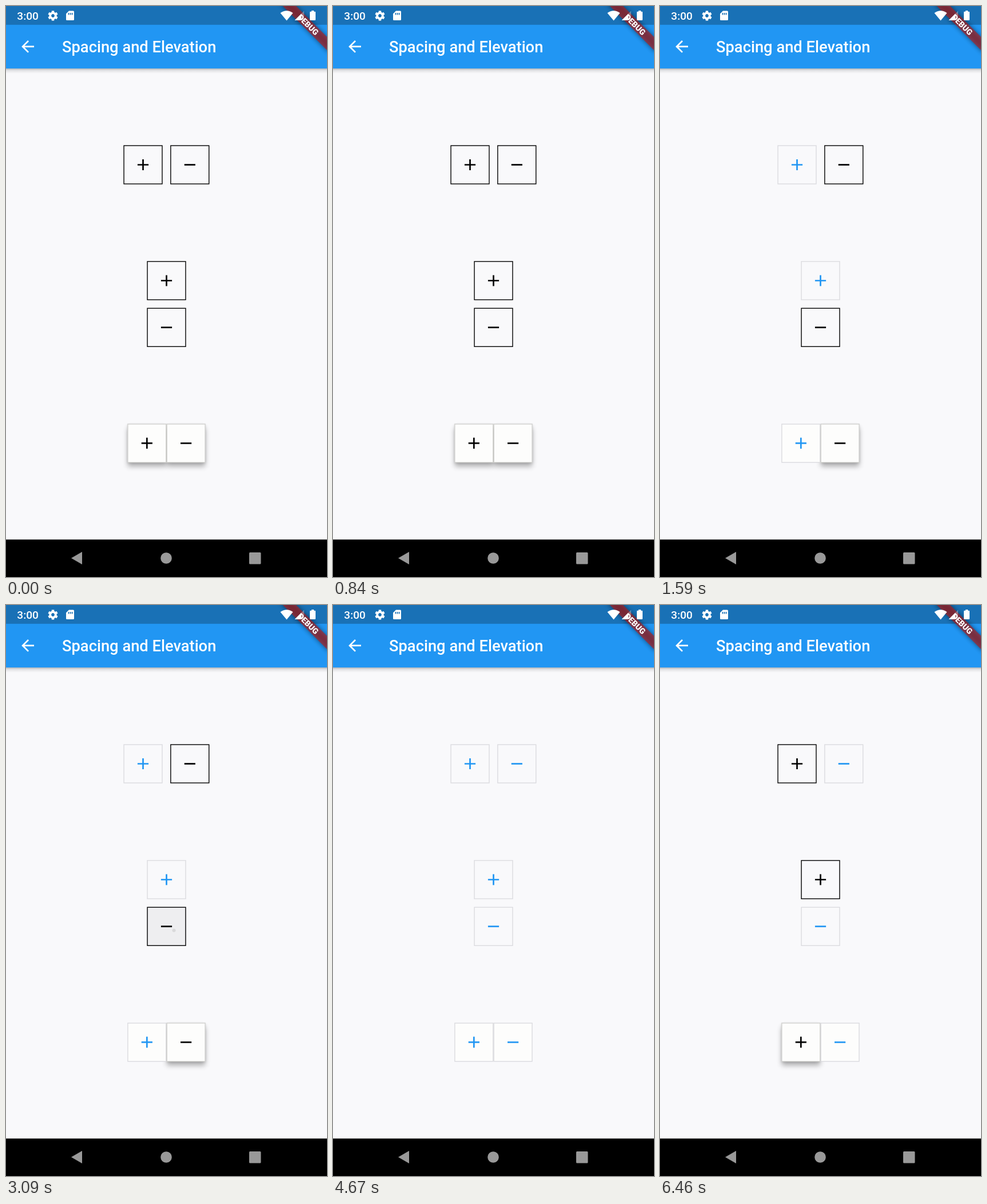
These frames come from a looping animation (561x998 px, 6500 ms). An HTML page:

```html
<!DOCTYPE html>
<html lang="en">
<head>
<meta charset="utf-8">
<title>Spacing and Elevation</title>
<style>
html, body { margin: 0; width: 100%; height: 100%; overflow: hidden; background: #f9f9fb; }
svg { display: block; width: 100vw; height: 100vh; }
text { font-family: Roboto, sans-serif; fill: #fff; }
</style>
</head>
<body>
<svg id="stage" viewBox="0 0 561 998">
  <defs>
    <linearGradient id="barShadow" x1="0" y1="0" x2="0" y2="1">
      <stop offset="0" stop-color="#000" stop-opacity=".27"/>
      <stop offset=".4" stop-color="#000" stop-opacity=".09"/>
      <stop offset="1" stop-color="#000" stop-opacity="0"/>
    </linearGradient>
    <filter id="soft" x="-40%" y="-40%" width="180%" height="180%"><feGaussianBlur stdDeviation="5"/></filter>
    <filter id="tight" x="-40%" y="-40%" width="180%" height="180%"><feGaussianBlur stdDeviation="2"/></filter>
    <filter id="ribbonBlur" x="-20%" y="-80%" width="140%" height="260%"><feGaussianBlur stdDeviation="4"/></filter>
  </defs>

  <rect width="561" height="998" fill="#f9f9fb"/>
  <rect y="109" width="561" height="9" fill="url(#barShadow)"/>
  <rect width="561" height="109.2" fill="#2196f3"/>
  <rect width="561" height="32.8" fill="#1971b6"/>
  <path transform="translate(21.7 54.5) scale(1.365)" fill="#fff" d="M20 11H7.83l5.59-5.59L12 4l-8 8 8 8 1.41-1.41L7.83 13H20z"/>
  <text x="98" y="81" font-size="27.3" font-weight="500">Spacing and Elevation</text>

  <g id="shadows"></g>
  <g id="buttons"></g>

  <g transform="translate(561 0) rotate(45)">
    <rect x="-60" y="38.2" width="120" height="16.4" fill="#000" opacity=".5" filter="url(#ribbonBlur)"/>
    <rect x="-60" y="38.2" width="120" height="16.4" fill="#b71c1c" opacity=".63"/>
    <text y="51.4" font-size="13.9" font-weight="900" text-anchor="middle">DEBUG</text>
  </g>

  <text x="19.3" y="24" font-size="19.1" font-weight="500">3:00</text>
  <g transform="translate(82 17)" fill="none" stroke="#fff">
    <circle r="4.8" stroke-width="3.8"/>
    <g id="teeth" stroke-width="4.4"></g>
  </g>
  <path fill="#fff" fill-rule="evenodd" d="M110 8.5h7.4q1.6 0 1.6 1.6v13.3q0 1.6-1.6 1.6h-10.8q-1.6 0-1.6-1.6V13.5zM108.6 12v3.6h1.7V12zM111.7 12v3.6h1.7V12zM114.8 12v3.6h1.7V12z"/>
  <path fill="#fff" d="M479.5 12.3Q490.5 4 501.5 12.3L490.5 25.5z"/>
  <path fill="#fff" opacity=".3" d="M521 8.5V25H504.5z"/>
  <path fill="#fff" d="M516 13.5V25H504.5z"/>
  <path fill="#fff" d="M534 8h4v1.7h1.7q1.3 0 1.3 1.3v12.7q0 1.3-1.3 1.3h-7.4q-1.3 0-1.3-1.3V11q0-1.3 1.3-1.3H534z"/>

  <rect y="932.5" width="561" height="66" fill="#000"/>
  <g fill="#999">
    <path d="M114 965L133 954V976z"/>
    <circle cx="280" cy="965" r="9.8"/>
    <rect x="425" y="955" width="20.5" height="20.5" rx="1.5"/>
  </g>
</svg>
<script>
const LOOP = 6500;
const SIDE = 66.9;
const FADE = 200;
const BLUE = [33, 150, 243];

// Each tap toggles one sign in all three groups when the finger lifts.
const taps = [
  { button: 0, dx: 12, dy: 8, down: 1150, up: 1250, sign: "plus" },
  { button: 3, dx: 13, dy: 7, down: 3040, up: 3150, sign: "minus" },
  { button: 4, dx: 10, dy: 8, down: 5060, up: 5160, sign: "plus" },
];

const places = [
  [239.5, 277.5, "plus"], [321.3, 277.5, "minus"],
  [280.5, 480, "plus"], [280.5, 561.8, "minus"],
  [246.3, 764.2, "plus", true], [314.6, 764.2, "minus", true],
];

const clamp = v => Math.max(0, Math.min(1, v));
const byId = id => document.getElementById(id);

function add(parent, tag, attrs) {
  const node = document.createElementNS("http://www.w3.org/2000/svg", tag);
  parent.append(node);
  set(node, attrs);
  return node;
}

function set(node, attrs) {
  for (const key in attrs) node.setAttribute(key, attrs[key]);
}

function square(parent, attrs) {
  return add(parent, "rect", { x: -SIDE / 2, y: -SIDE / 2, width: SIDE, height: SIDE, ...attrs });
}

for (let i = 0; i < 6; i++) {
  add(byId("teeth"), "path", { d: "M0-5V-8.6", transform: `rotate(${i * 60})` });
}

const buttons = places.map(([x, y, sign, raised], i) => {
  const at = { transform: `translate(${x} ${y})` };
  const shadow = raised && add(byId("shadows"), "g", at);
  if (raised) {
    square(shadow, { y: -SIDE / 2 + 7, filter: "url(#soft)", opacity: .3 });
    square(shadow, { y: -SIDE / 2 + 1, filter: "url(#tight)", opacity: .18 });
  }
  const group = add(byId("buttons"), "g", at);
  const clip = add(add(group, "clipPath", { id: "clip" + i }), "rect",
    { x: -SIDE / 2, y: -SIDE / 2, width: SIDE, height: SIDE });
  square(group, { fill: raised ? "#fdfdfc" : "none" });
  const highlight = square(group, { opacity: 0 });
  const splash = add(add(group, "g", { "clip-path": `url(#${"clip" + i})` }), "circle", { opacity: 0 });
  const border = square(group, { fill: "none", "stroke-width": 1.4 });
  const icon = add(group, "path", {
    d: sign === "plus" ? "M-9.6 0H9.6M0-9.6V9.6" : "M-9.6 0H9.6",
    "stroke-width": 2.7,
  });
  return { sign, raised, shadow, highlight, splash, border, icon };
});

// Whether the sign is on, and how far its colour and height have eased.
function signState(sign, t) {
  let on = false, level = 0;
  for (const tap of taps) {
    if (tap.sign !== sign || t < tap.up) continue;
    on = !on;
    const p = clamp((t - tap.up) / FADE);
    level = on ? p : 1 - p;
  }
  return { on, level };
}

function press(button, tap, t) {
  const held = Math.min(t, tap.up) - tap.down;
  const since = Math.max(0, t - tap.up);
  const fade = tap && t >= tap.down ? 1 - clamp(since / FADE) : 0;
  set(button.highlight, { opacity: .045 * clamp(held / 50) * fade });
  set(button.splash, {
    cx: tap.dx, cy: tap.dy,
    r: Math.max(0, Math.min(62, held * .06 + since * .9)),
    opacity: .09 * fade,
  });
}

function draw(t) {
  const states = { plus: signState("plus", t), minus: signState("minus", t) };
  for (const b of buttons) {
    const { on, level } = states[b.sign];
    const idle = b.raised ? "#d2d2cf" : "#000";
    set(b.border, { stroke: on ? "#dbdbdf" : idle });
    set(b.icon, { stroke: `rgb(${BLUE.map(c => Math.round(c * level))})` });
    if (b.shadow) set(b.shadow, { opacity: 1 - level });
  }
  for (const tap of taps) press(buttons[tap.button], tap, t);
}

const start = performance.now();
function tick() {
  draw((performance.now() - start) % LOOP);
  requestAnimationFrame(tick);
}
tick();
</script>
</body>
</html>
```
